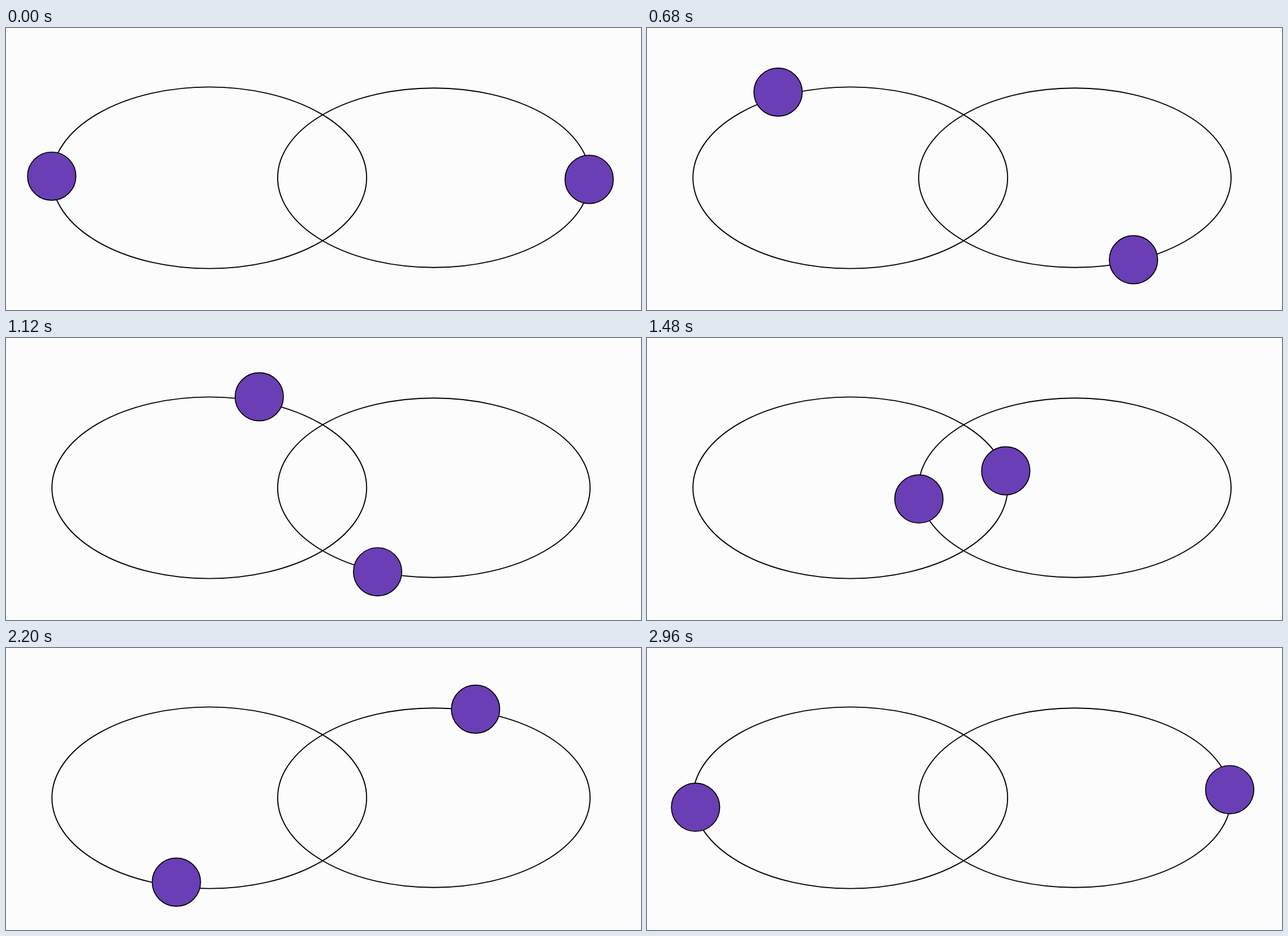
These frames come from a looping animation (1122 px wide and 499 px high, 3 s). An HTML page with a canvas:

```html
<!DOCTYPE html>
<html lang="en">
<head>
<meta charset="utf-8">
<title>Two orbits</title>
<style>
html, body { margin: 0; width: 100%; height: 100%; overflow: hidden; background: #fcfcfc; }
canvas { display: block; width: 1122px; height: 499px; }
</style>
</head>
<body>
<canvas id="stage" width="1122" height="499"></canvas>
<script>
const ctx = document.getElementById("stage").getContext("2d");
const LOOP = 3000, STEP = 40, RADIUS = 42.7;
const TIMES = [0, 560, 680, 1120, 1480, 1880, 2240, 2520, 2800, 2960];

const rings = [
  { x: 359.2, y: 265, rx: 278, ry: 160.6 },
  { x: 756, y: 265, rx: 276, ry: 158.7 }
];

// Natural cubic spline through (xs, ys).
function spline(xs, ys) {
  const n = xs.length, m = new Array(n).fill(0), c = [0], d = [0];
  const h = i => xs[i + 1] - xs[i];
  const slope = i => (ys[i + 1] - ys[i]) / h(i);
  for (let i = 1; i < n - 1; i++) {
    const p = 2 * (h(i - 1) + h(i)) - h(i - 1) * c[i - 1];
    c[i] = h(i) / p;
    d[i] = (6 * (slope(i) - slope(i - 1)) - h(i - 1) * d[i - 1]) / p;
  }
  for (let i = n - 2; i > 0; i--) m[i] = d[i] - c[i] * m[i + 1];
  return t => {
    let i = 0;
    while (i < n - 2 && t > xs[i + 1]) i++;
    const w = h(i), b = (t - xs[i]) / w, a = 1 - b;
    return a * ys[i] + b * ys[i + 1]
      + ((a ** 3 - a) * m[i] + (b ** 3 - b) * m[i + 1]) * w * w / 6;
  };
}

// Clockwise travel near an ellipse: angle and relative distance are eased separately.
function orbit(cx, cy, rx, ry, points) {
  const angles = [], dists = [];
  points.forEach(([x, y], i) => {
    const u = (x - cx) / rx, v = (y - cy) / ry;
    let a = Math.atan2(v, u);
    while (i && a < angles[i - 1]) a += 2 * Math.PI;
    angles.push(a);
    dists.push(Math.hypot(u, v));
  });
  const angle = spline(TIMES, angles), dist = spline(TIMES, dists);
  return t => {
    const a = angle(t), r = dist(t);
    return [cx + rx * r * Math.cos(a), cy + ry * r * Math.sin(a)];
  };
}

const balls = [
  orbit(358, 256, 278, 161.4, [
    [80.8, 262.2], [188.5, 127.5], [231.6, 113.5], [447.5, 104], [633.9, 235],
    [464.6, 403.2], [285.5, 412.5], [190.5, 386.1], [114.7, 332.5], [85.8, 281.8]
  ]),
  orbit(755, 263, 275.8, 161.1, [
    [1030.4, 267.9], [899.4, 399.4], [859.6, 410], [656.6, 413.7], [480.4, 284.8],
    [669.5, 113.2], [844.4, 110.6], [936.6, 141.4], [1008.4, 197.7], [1029.6, 250.7]
  ])
];

function ellipse(x, y, rx, ry) {
  ctx.beginPath();
  ctx.ellipse(x, y, rx, ry, 0, 0, 2 * Math.PI);
}

function draw(now) {
  const t = Math.floor((now % LOOP) / STEP) * STEP;
  ctx.fillStyle = "#fcfcfc";
  ctx.fillRect(0, 0, 1122, 499);
  ctx.strokeStyle = "#000";
  ctx.lineWidth = 1.9;
  for (const r of rings) {
    ellipse(r.x, r.y, r.rx, r.ry);
    ctx.stroke();
  }
  ctx.fillStyle = "#6a3eb5";
  ctx.lineWidth = 1.7;
  for (const at of balls) {
    ellipse(...at(t), RADIUS, RADIUS);
    ctx.fill();
    ctx.stroke();
  }
}

let start;
function frame(now) {
  if (start === undefined) start = now;
  draw(now - start);
  requestAnimationFrame(frame);
}
draw(0);
requestAnimationFrame(frame);
</script>
</body>
</html>
```
